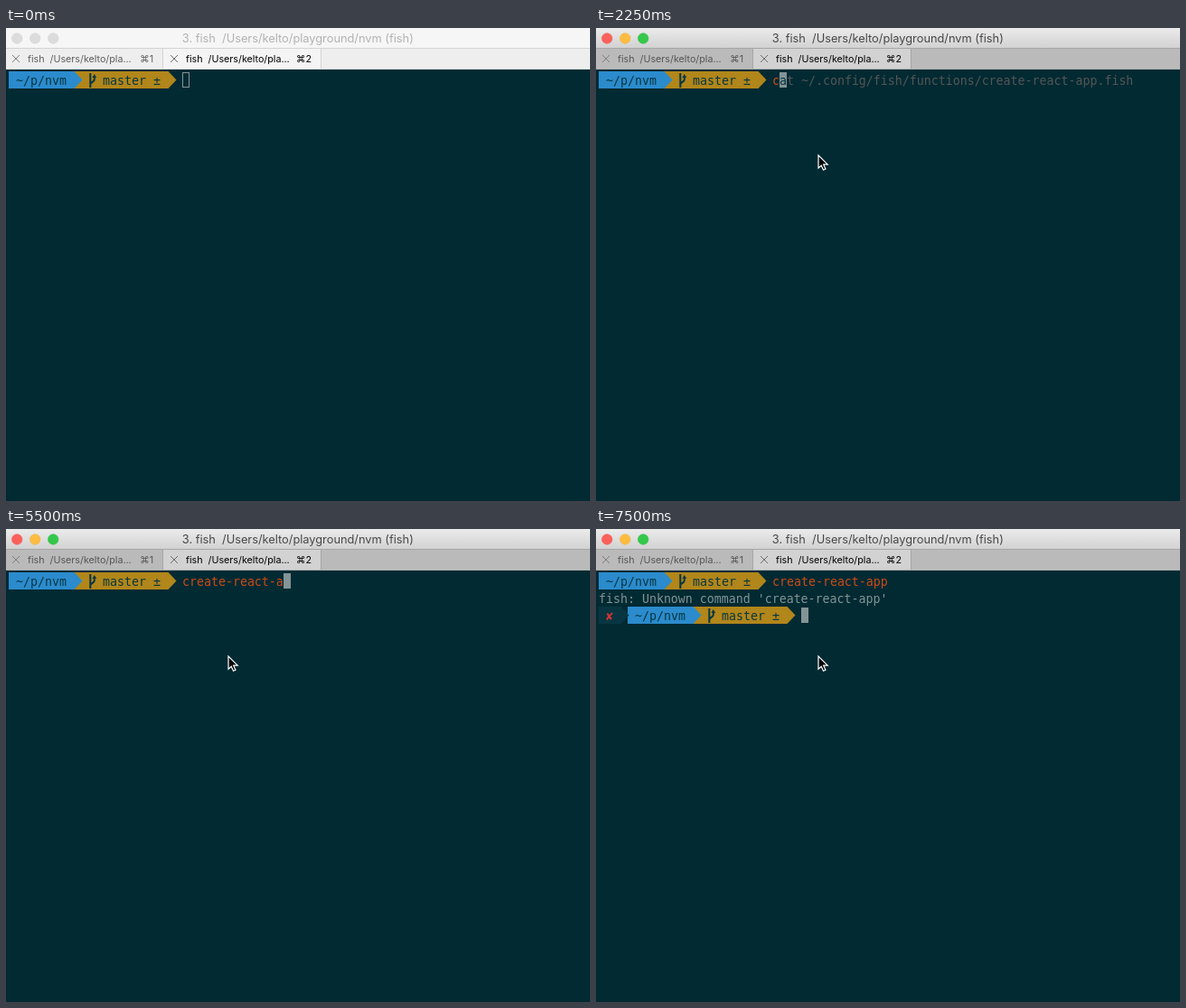
An HTML page for the animation above (8000 ms loop, 646 by 524 pixels).

```html
<!DOCTYPE html>
<html lang="en">
<head>
<meta charset="utf-8">
<title>Terminal session</title>
<style>
  html, body { margin: 0; width: 100%; height: 100%; overflow: hidden; background: #022a33; }
  svg { display: block; width: 646px; height: 524px; }
  text { white-space: pre; }
  .ui { font-family: Inter, Roboto, sans-serif; }
  .mono { font-family: "DejaVu Sans Mono", "Liberation Mono", monospace; font-size: 13.288px; }
</style>
</head>
<body>
<svg id="stage" viewBox="0 0 646 524" xmlns="http://www.w3.org/2000/svg">
  <defs>
    <linearGradient id="bar" x1="0" y1="0" x2="0" y2="1">
      <stop offset="0" stop-color="#ebebeb"/>
      <stop offset="1" stop-color="#d2d2d2"/>
    </linearGradient>
  </defs>
  <g id="chrome"></g>
  <g id="screen"></g>
  <path id="mouse" d="M1 1V15.2L4.2 12.2L6.5 17.3L8.9 16.2L6.7 11.2H11.2Z"
        fill="#000" stroke="#fff" stroke-width="1.2"/>
</svg>
<script>
const LOOP = 8000, CELL = 8, LINE = 19, LEFT = 3, TOP = 48;
const BG = '#022a33', BLUE = '#2b8bcc', GOLD = '#b1861a', DARK = '#073642',
      GREY = '#839496', ORANGE = '#cb4b16', RED = '#dc322f', HINT = '#555';
const COMMAND = 'create-react-app';
const HOME = '/Users/kelto/';
const FOCUS_AT = 1000, RUN_AT = 6000, PROMPT_AT = 6250;

// [time, typed characters, suggested rest of the line]
const KEYS = [
  [0, 0, ''],
  [2250, 1, 'at ~/.config/fish/functions/create-react-app.fish'],
  [2500, 3, ''], [2750, 5, ''], [3000, 6, 'homedir'], [3500, 7, ''],
  [3750, 9, ''], [4000, 11, ''], [4250, 12, ''], [4500, 13, ''],
  [5500, 14, ''], [5750, 16, '']
];
// [time, x, y]; the pointer enters from above
const POINTER = [[0, 257, -40], [500, 257, -7], [750, 245, 140]];

const $ = id => document.getElementById(id);
const at = (list, t) => list.filter(item => item[0] <= t).pop();
const colX = col => LEFT + col * CELL;
const rowY = row => TOP + row * LINE;

const rect = (x, y, w, h, fill) =>
  `<rect x="${x}" y="${y}" width="${w}" height="${h}" fill="${fill}"/>`;
const label = (x, y, str, size, fill, anchor = 'start') =>
  `<text class="ui" x="${x}" y="${y}" font-size="${size}" fill="${fill}" text-anchor="${anchor}">${str}</text>`;
const mono = (col, row, str, fill) =>
  `<text class="mono" x="${colX(col)}" y="${rowY(row) + 15}" fill="${fill}">${str}</text>`;
const block = (col, row) => rect(colX(col), rowY(row) + 1, CELL, 17, GREY);

function tab(x, name, key, ink, cross) {
  return `<path d="M${x + 7} 30l8 8m0 -8l-8 8" stroke="${cross}"/>` +
    label(x + 24, 38, name, 10.72, ink) +
    label(x + 163, 38, key, 10.72, ink, 'end');
}

function chrome(active, job) {
  const lights = active ? ['#fc605b', '#fdbc40', '#34c84a'] : Array(3).fill('#dcdcdc');
  const edges = active ? ['#ee5550', '#eeae3a', '#2dba42'] : Array(3).fill('#d1d1d1');
  const line = active ? '#a6a6a6' : '#d4d4d4';
  const path = job === 'fish' ? HOME + 'pla...' : '/U...';
  let out = rect(0, 0, 646, 22, active ? 'url(#bar)' : '#f6f6f6') +
    rect(0, 22, 646, 24, active ? '#bababa' : '#eee') +
    rect(174, 23, 174, 23, active ? '#d2d2d2' : '#f4f4f4') +
    rect(0, 22, 646, 1, line) + rect(173, 23, 1, 22, line) + rect(348, 23, 1, 22, line) +
    rect(0, 45, 646, 1, active ? '#a9b0b1' : '#d3dcdc');
  lights.forEach((fill, i) => {
    out += `<circle cx="${12.2 + i * 20}" cy="11.5" r="5.8" fill="${fill}" stroke="${edges[i]}" stroke-width=".5"/>`;
  });
  return out +
    label(322.8, 16, `3. ${job}  ${HOME}playground/nvm (fish)`, 12.8, active ? '#474747' : '#b2b2b2', 'middle') +
    tab(0, `fish  ${HOME}pla...`, '⌘1', active ? '#555' : '#5e5e5e', '#808080') +
    tab(175, `${job}  ${path}`, '⌘2', '#000', '#6c6c6c');
}

// Coloured prompt cell range with a pointed right end
function segment(from, to, row, fill) {
  const x = colX(from), y = rowY(row), end = colX(to) + .5;
  return `<path d="M${x} ${y}H${end}L${end + 9} ${y + 9.5}L${end} ${y + LINE}H${x}Z" fill="${fill}"/>`;
}

function branch(col, row) {
  return `<g transform="translate(${colX(col)} ${rowY(row)})" fill="none" stroke="${DARK}" stroke-width="2">` +
    `<path d="M2.3 2V18M2.3 14.5C2.3 11.5 6.8 12.5 6.8 9V6"/>` +
    `<path d="M4.4 7L6.8 3L9.2 7Z" fill="${DARK}" stroke="none"/></g>`;
}

function prompt(row, failed) {
  const c = failed ? 4 : 0;
  return segment(c, c + 22, row, GOLD) + segment(c, c + 9, row, BLUE) +
    (failed ? segment(0, 3, row, DARK) + mono(1, row, '✘', RED) : '') +
    mono(c + 1, row, '~/p/nvm', DARK) + branch(c + 11, row) +
    mono(c + 13, row, 'master ±', DARK);
}

function screen(t) {
  const [, count, hint] = at(KEYS, t);
  const end = 24 + count;
  let out = rect(0, 46, 646, 478, BG) + prompt(0, false) +
    mono(24, 0, COMMAND.slice(0, count), ORANGE);
  if (t >= RUN_AT) {
    out += mono(0, 1, `fish: Unknown command '${COMMAND}'`, GREY);
    return out + (t >= PROMPT_AT ? prompt(2, true) + block(28, 2) : block(0, 2));
  }
  if (t < FOCUS_AT) {
    return out + `<rect x="${colX(end) + .5}" y="${rowY(0) + 1.5}" width="7" height="16" fill="none" stroke="${GREY}"/>`;
  }
  return out + block(end, 0) + mono(end, 0, hint.slice(0, 1), DARK) +
    mono(end + 1, 0, hint.slice(1), HINT);
}

let drawn = -1;
function draw(t) {
  const step = Math.floor(t / 250);
  if (step === drawn) return;
  drawn = step;
  const running = t >= RUN_AT && t < PROMPT_AT;
  const [, x, y] = at(POINTER, t);
  $('chrome').innerHTML = chrome(t >= FOCUS_AT, running ? COMMAND : 'fish');
  $('screen').innerHTML = screen(t);
  $('mouse').setAttribute('transform', `translate(${x} ${y})`);
}

const start = performance.now();
function tick() {
  draw((performance.now() - start) % LOOP);
  requestAnimationFrame(tick);
}
tick();
</script>
</body>
</html>
```
